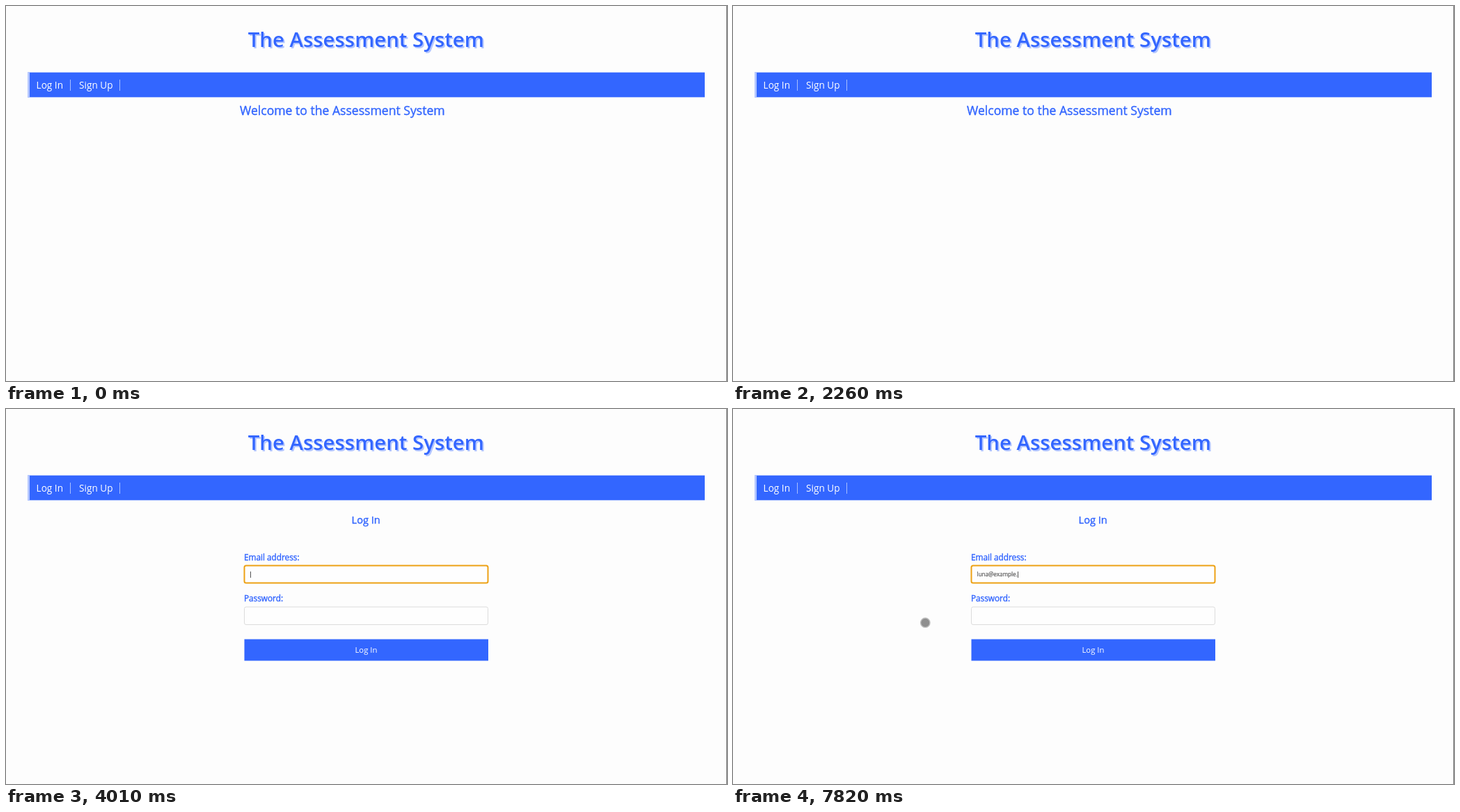
These frames come from a looping animation (1036 by 540 pixels, 8000 ms). An HTML page:

```html
<!DOCTYPE html>
<html lang="en">
<head>
<meta charset="utf-8">
<title>Assessment System</title>
<style>
  html, body { margin: 0; width: 100%; height: 100%; overflow: hidden; background: #fdfdfd; }
  svg { display: block; width: 1036px; height: 540px; font-family: "Open Sans", "Noto Sans", sans-serif; }
  text { white-space: pre; }
  .blue { fill: #3366ff; }
  .pale { fill: #b3c6ff; }
  .title { font-size: 29.4px; font-weight: 600; }
  .medium { fill: #3366ff; stroke: #3366ff; stroke-width: .4; }
  .nav { fill: #fff; font-size: 13.6px; }
  .label { font-size: 11.8px; }
  .field { fill: #fefefe; stroke: #dcdcdc; }
  .focus { stroke: #eda114; stroke-width: 2; }
</style>
</head>
<body>
<svg viewBox="0 0 1036 540">
  <g id="page">
    <text class="title pale" x="349.7" y="61.3">The Assessment System</text>
    <text class="title blue" x="347.7" y="59.3">The Assessment System</text>
    <rect class="pale" x="31" y="95" width="973" height="37"/>
    <rect class="blue" x="34" y="96" width="970" height="35"/>
    <text id="login" class="nav" x="43.6" y="118.5">Log In</text>
    <text class="nav" x="105.1" y="118.5">Sign Up</text>
    <path d="M92.5 106v16M163.5 106v16" stroke="#a9beff"/>
    <text id="welcome" class="medium" x="336" y="157.3" font-size="17.6">Welcome to the Assessment System</text>
    <g id="form">
      <text class="medium" x="496.6" y="164.5" font-size="14.6">Log In</text>
      <text class="medium label" x="341.9" y="217.8">Email address:</text>
      <rect id="email" class="field" x="342.5" y="225.5" width="350" height="25" rx="2.5"/>
      <text id="typed" x="350.6" y="241.3" font-size="8.1" fill="#555" stroke="#555" stroke-width=".2"></text>
      <rect id="caret" y="234" width="1" height="9" fill="#555"/>
      <text class="medium label" x="341.9" y="277.3">Password:</text>
      <rect class="field" x="342.5" y="285" width="350" height="25.5" rx="2.5"/>
      <rect class="blue" x="342.5" y="331.5" width="350.5" height="31"/>
      <text x="501.5" y="351" font-size="11.3" fill="#fff">Log In</text>
    </g>
  </g>
  <path id="arrow" d="M437.5 272.5v11l2.5-2.3 1.8 3.7 1.7-.8-1.7-3.5h3.2z" fill="#fff" stroke="#333" stroke-width=".9"/>
  <circle id="dot" r="6.7" fill="#8f8f8f" stroke="#bdbdbd" stroke-width="1.4"/>
  <path d="M1035.5 0v540" stroke="#777"/>
</svg>
<script>
const LOOP = 8000;

// Typing comes in bursts with an even rhythm.
const BURSTS = [
  { text: "luna", at: 5250, step: 165 },
  { text: "@example", at: 6230, step: 155 },
  { text: ".", at: 7820, step: 155 }
];

// Times between which the pointer dot can be seen.
const SEEN = [[300, 760], [940, 990], [1180, 2260], [2350, 2660], [4210, 4450], [4530, 6150], [6300, LOOP]];

const el = Object.fromEntries([...document.querySelectorAll("[id]")].map(n => [n.id, n]));
const show = (node, on) => { node.style.display = on ? "" : "none"; };
const within = (t, from, to) => t >= from && t < to;

// The dot sweeps along a curve to the menu, later slides off the form and rests.
function dotAt(t) {
  if (t < 3000) {
    const u = 1 / (1 + Math.exp((1030 - t) / 132));
    return [72 + 225 * (1 - u) ** 2, 344.5 - 225 * u ** 2.25];
  }
  if (t >= 4450) return [276.3, 307.7];
  const p = (t - 4210) / 240;
  return [400 - 138 * p, 262 + 43 * p];
}

function typedAt(t) {
  return BURSTS.map(({ text, at, step }) =>
    text.slice(0, Math.max(0, Math.floor((t - at) / step) + 1))).join("");
}

function draw(t) {
  const loggingIn = t >= 3160;
  const focused = t >= 3850;
  show(el.page, !within(t, 3160, 3230));
  show(el.welcome, !loggingIn);
  show(el.form, loggingIn);
  show(el.arrow, within(t, 3030, 3160));
  el.login.style.stroke = within(t, 2350, 3160) ? "#fff" : "none";
  el.login.style.strokeWidth = Math.min(0.5, Math.max(0, (t - 2300) / 400));

  el.email.classList.toggle("focus", focused);
  const typed = typedAt(t);
  el.typed.textContent = typed;
  show(el.caret, focused && !within(t, 4840, 5250));
  el.caret.setAttribute("x", Math.round(350.6 + (typed ? el.typed.getComputedTextLength() : 0)));

  show(el.dot, SEEN.some(([from, to]) => within(t, from, to)));
  el.dot.setAttribute("transform", `translate(${dotAt(t)})`);
}

const start = performance.now();
function tick(now) {
  draw(Math.max(0, now - start) % LOOP);
  requestAnimationFrame(tick);
}
draw(0);
requestAnimationFrame(tick);
</script>
</body>
</html>
```
